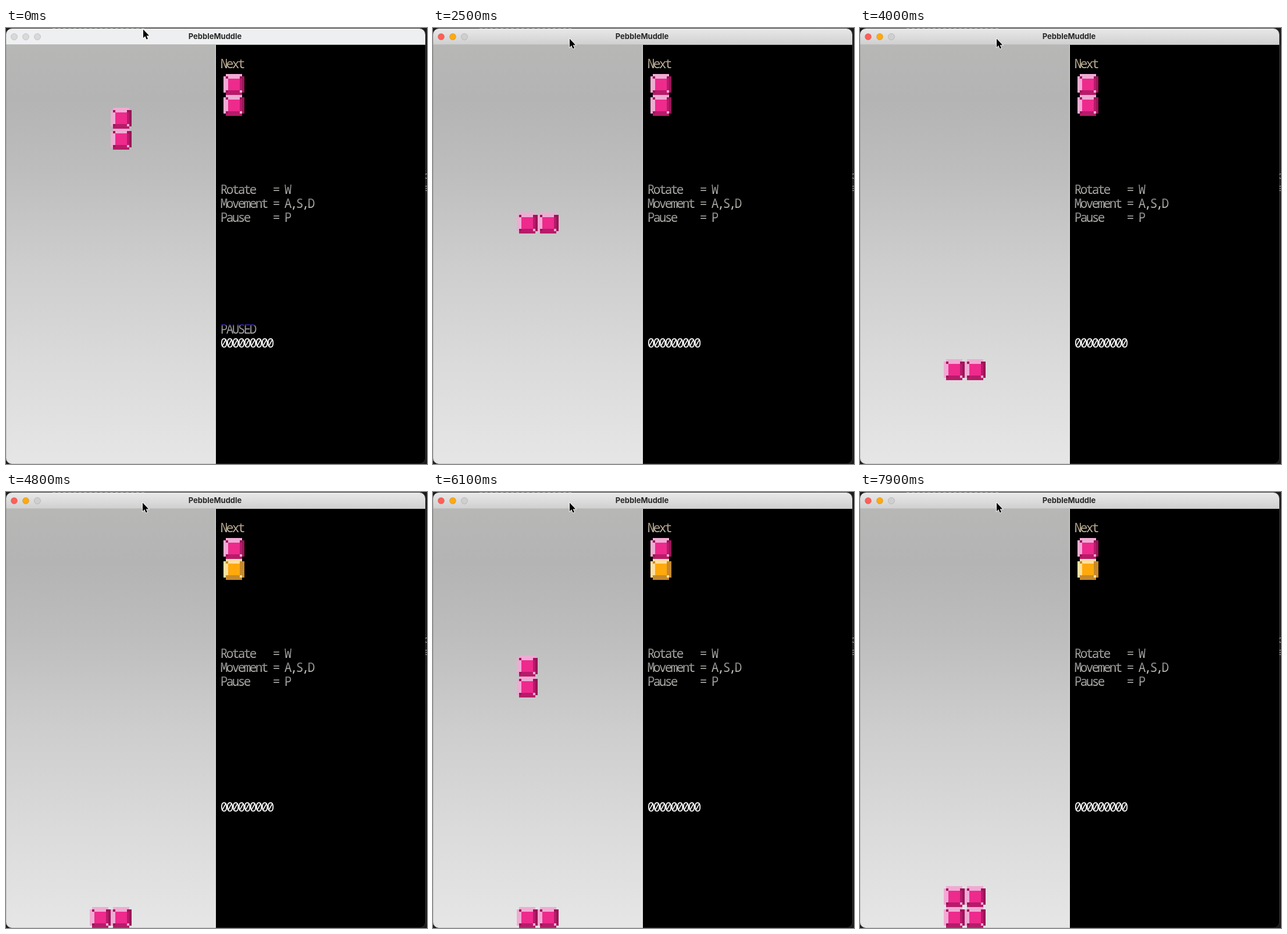
An HTML page with a canvas that plays this animation: 724 by 749 pixels, repeating every 8000 ms.

```html
<!DOCTYPE html>
<html lang="en">
<head>
<meta charset="utf-8">
<title>PebbleMuddle</title>
<style>
  html, body { margin: 0; width: 100%; height: 100%; overflow: hidden; background: #1c1c1c; }
  canvas { display: block; }
</style>
</head>
<body>
<canvas id="stage" width="724" height="749"></canvas>
<script>
const ctx = document.getElementById('stage').getContext('2d');
const LOOP = 8000, CELL = 36, DOT = 4, TOP = 29;
const TICK = 206, TICK_ZERO = 3490;
const SPAWN = 4726;

// l = light, d = dark, m = shade, p = face
const FACE_ROW = 'llpppppmd';
const GEM = ['.lllllll.', 'ldllllldd', ...Array(5).fill(FACE_ROW), 'ldmmmmmld', '.mmmmmmm.'];
const PINK = { l: '#efabd3', p: '#ee2a8d', m: '#b71b69', d: '#9c1459' };
const GOLD = { l: '#ffdf9f', p: '#ffa90d', m: '#c78a2a', d: '#c78a2a' };

function gradient(y0, y1, stops) {
  const g = ctx.createLinearGradient(0, y0, 0, y1);
  stops.forEach(([at, color]) => g.addColorStop(at, color));
  return g;
}

function rect(x, y, w, h, fill) {
  ctx.fillStyle = fill;
  ctx.fillRect(x, y, w, h);
}

function makeGem(colors) {
  const tile = document.createElement('canvas');
  tile.width = tile.height = CELL;
  const c = tile.getContext('2d');
  GEM.forEach((row, y) => [...row].forEach((key, x) => {
    if (key === '.') return;
    c.fillStyle = colors[key];
    c.fillRect(x * DOT, y * DOT, DOT, DOT);
  }));
  return tile;
}

const pink = makeGem(PINK), gold = makeGem(GOLD);
const boardFill = gradient(TOP, 749, [
  [0, '#b7b7b6'], [.13, '#b4b4b4'], [.3, '#bdbdbd'], [.52, '#cdcdcd'], [.75, '#dadada'], [1, '#e6e6e6']]);
const activeBar = gradient(1, 28, [[0, '#e9e9e9'], [1, '#d0d0d0']]);

function cell(col, row) {
  ctx.drawImage(pink, col * CELL, TOP + row * CELL);
}

// The second gem sits beside the pivot, at offset (dx, dy).
function pair(col, row, [dx, dy]) {
  cell(col, row);
  cell(col + dx, row + dy);
}

function label(text, baseline, stops, weight = 400) {
  ctx.save();
  ctx.font = `${weight} 21px "Noto Sans Mono", monospace`;
  ctx.fontStretch = 'extra-condensed';
  ctx.textAlign = 'center';
  ctx.fillStyle = gradient(baseline - 16, baseline + 4, stops);
  [...text].forEach((ch, i) => ctx.fillText(ch, 375 + i * 10, baseline));
  ctx.restore();
}

function desktop() {
  rect(0, 0, 724, 749, '#1c1c1c');
  ctx.font = '15px "DejaVu Sans Mono", monospace';
  ctx.textAlign = 'left';
  ctx.fillStyle = '#999';
  ctx.fillText('c', 718, 259);
  ctx.fillText('e', 718, 280);
  for (let x = 80; x < 235; x += 9) rect(x, 0, 5, 1, '#777');
}

function titleBar(active) {
  rect(0, 1, 721, 27, active ? activeBar : '#eeeff0');
  rect(0, 28, 721, 1, '#bdbdbd');
  const lights = active ? ['#fe5f57', '#ffa910', '#cfcfcf'] : Array(3).fill('#d9d9d9');
  lights.forEach((color, i) => {
    ctx.beginPath();
    ctx.arc(14 + i * 20, 15, 5.5, 0, 7);
    ctx.fillStyle = color;
    ctx.fill();
    ctx.strokeStyle = 'rgba(0,0,0,.14)';
    ctx.lineWidth = 1;
    ctx.stroke();
  });
  ctx.font = '700 13px Inter, sans-serif';
  ctx.textAlign = 'center';
  ctx.fillStyle = '#262626';
  ctx.fillText('PebbleMuddle', 359.5, 19);
}

function sidePanel(t) {
  const grey = [[0, '#808080'], [.75, '#b8b6b0'], [1, '#fff']];
  rect(361, TOP, 360, 720, '#000');
  label('Next', 69, [[0, '#a09478'], [.6, '#bcb09a'], [1, '#d8d8d0']]);
  ctx.drawImage(pink, 374, 79);
  ctx.drawImage(t < SPAWN ? pink : gold, 374, 115);
  label('Rotate   = W', 285, grey);
  label('Movement = A,S,D', 309, grey);
  label('Pause    = P', 333, grey);
  if (t < 1450) label('PAUSED', 525, [[0, '#3428a0'], [.08, '#3428a0'], [.12, '#888'], [1, '#bbb']]);
  label('000000000', 549, [[0, '#fff'], [1, '#fff']], 500);
}

function pieces(t) {
  const tick = Math.floor((t - TICK_ZERO) / TICK);
  const row = Math.min(19, Math.max(3, 13 + tick));
  pair(5, row, t < 2000 ? [0, 1] : [-1, 0]);
  if (t < SPAWN + TICK) return;
  const turn = t < 5300 ? [0, 1] : t < 5500 ? [-1, 0] : t < 6500 ? [0, -1] : [1, 0];
  const nudge = t < 7700 ? 0 : 1;
  pair(t < 5800 ? 5 : 4, Math.min(18, tick - 4 + nudge), turn);
}

const arrow = new Path2D('M0 0V14.5L3.3 11.5L5.6 17L8 16L5.7 10.7H10.2Z');

function cursor(t) {
  const p = Math.min(1, Math.max(0, (t - 50) / 450));
  ctx.save();
  ctx.translate(236 - p, 2.5 + 16 * p);
  ctx.fillStyle = '#000';
  ctx.strokeStyle = '#fff';
  ctx.lineWidth = 1.6;
  ctx.stroke(arrow);
  ctx.fill(arrow);
  ctx.restore();
}

function draw() {
  const t = performance.now() % LOOP;
  desktop();
  ctx.save();
  ctx.beginPath();
  ctx.roundRect(0, 1, 721, 748, 10);
  ctx.clip();
  rect(0, TOP, 361, 720, boardFill);
  rect(360, TOP, 1, 720, '#e4e4e4');
  titleBar(t >= 700);
  sidePanel(t);
  pieces(t);
  ctx.restore();
  ctx.beginPath();
  ctx.roundRect(.5, .5, 721, 748, 10);
  ctx.strokeStyle = 'rgba(120,120,120,.3)';
  ctx.lineWidth = 1;
  ctx.stroke();
  cursor(t);
  requestAnimationFrame(draw);
}
draw();
</script>
</body>
</html>
```
